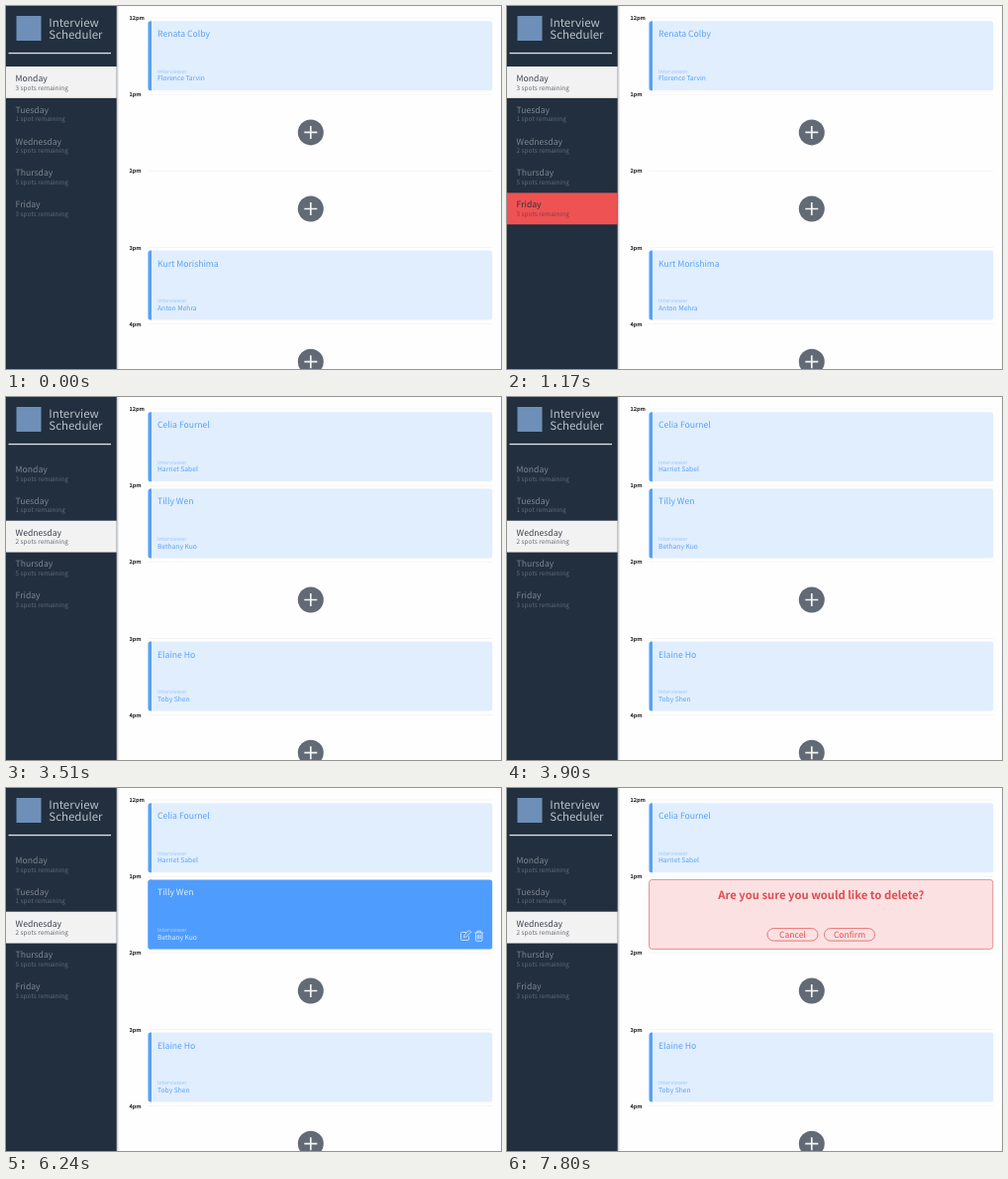
Recreate the animation shown at these times as an HTML page. Size 500x366 px, loop 8 s.

```html
<!DOCTYPE html>
<html lang="en">
<head>
<meta charset="utf-8">
<title>Interview Scheduler</title>
<style>
  html, body { margin: 0; width: 100%; height: 100%; overflow: hidden; background: #fefefe; }
  svg { display: block; width: 500px; height: 366px; }
  text {
    font-family: "Noto Sans CJK JP", "Noto Sans CJK SC", "Noto Sans", sans-serif;
    text-rendering: geometricPrecision;
    white-space: pre;
  }
</style>
</head>
<body>
<svg id="stage" viewBox="0 0 500 366"></svg>
<script>
const LOOP = 8000;
const ROW = 31.85;    // height of a day in the sidebar
const SLOT = 77.1;    // height of an hour in the schedule
const TOP = 15.3;     // top of the first card
const BLUE = '#58a1f6';
const RED = '#e04d50';
const stage = document.getElementById('stage');

function add(parent, tag, attrs = {}, content) {
  const el = document.createElementNS('http://www.w3.org/2000/svg', tag);
  for (const key in attrs) el.setAttribute(key, attrs[key]);
  if (content) el.textContent = content;
  parent.appendChild(el);
  return el;
}

function label(parent, x, y, size, fill, content, weight = 400, anchor = 'start') {
  return add(parent, 'text', {
    x, y, fill, 'font-size': size, 'font-weight': weight, 'text-anchor': anchor
  }, content);
}

const show = (el, on) => el.setAttribute('display', on ? 'inline' : 'none');
const group = (parent, y = 0) => add(parent, 'g', { transform: `translate(0 ${y})` });

// Sidebar
add(stage, 'rect', { width: 500, height: 366, fill: '#fefefe' });
add(stage, 'rect', { x: 111, width: 3, height: 366, fill: '#eceef0' });
add(stage, 'rect', { x: 111, width: 1.8, height: 366, fill: '#c6cad0' });
add(stage, 'rect', { width: 111.7, height: 366, fill: '#222f3e' });
add(stage, 'rect', { x: 10.5, y: 10, width: 25, height: 25, fill: '#6d8fb8' });
label(stage, 43.3, 20.8, 11.5, '#b9c0c8', 'Interview', 300);
label(stage, 43.3, 32.5, 11.5, '#b9c0c8', 'Scheduler', 300);
add(stage, 'rect', { x: 2.5, y: 46.9, width: 103.5, height: 1.3, fill: '#dfe3e7' });

const DAY_STYLES = {
  idle: { back: 'none', title: '#7c8691', note: '#5f6b78' },
  hover: { back: '#ef5253', title: '#3c2d39', note: '#893d46' },
  selected: { back: '#f2f2f2', title: '#3b4250', note: '#666c75' }
};

const days = [
  ['Monday', '3 spots'], ['Tuesday', '1 spot'], ['Wednesday', '2 spots'],
  ['Thursday', '5 spots'], ['Friday', '3 spots']
].map(([name, spots], i) => {
  const g = group(stage, 61 + i * ROW);
  return {
    back: add(g, 'rect', { width: 111.7, height: ROW }),
    title: label(g, 9.6, 14.9, 8.65, '', name),
    note: label(g, 9.6, 23.6, 6.45, '', spots + ' remaining', 300)
  };
});

function styleDay(day, state) {
  for (const part in day) day[part].setAttribute('fill', DAY_STYLES[state][part]);
}

// Schedule
['12pm', '1pm', '2pm', '3pm', '4pm'].forEach((hour, i) => {
  const y = 12 + i * SLOT;
  label(stage, 124.5, y + 2.2, 5.55, '#1c1c1c', hour, 700);
  add(stage, 'rect', { x: 143.5, y: y - 0.4, width: 348, height: 0.8, fill: '#f3f3f3' });
});

function card(parent, slot, name, interviewer, active = false) {
  const g = group(parent, TOP + slot * SLOT);
  const ink = active ? '#e2efff' : BLUE;
  add(g, 'rect', { x: 143.5, width: 347.7, height: 70, rx: 2.5, fill: active ? '#4f9cff' : '#e1eefe' });
  add(g, 'path', { d: 'M147 0H146Q143.5 0 143.5 2.5V67.5Q143.5 70 146 70H147Z', fill: active ? '#4f9cff' : BLUE });
  label(g, 153, 16, 8.65, ink, name);
  label(g, 153, 52.7, 5.5, active ? '#b0d2ff' : '#9dc6fa', 'Interviewer', 300);
  label(g, 153, 60.2, 6.7, ink, interviewer);
  return g;
}

function plus(parent, slot) {
  const g = add(parent, 'g', { transform: `translate(307.8 ${50.3 + slot * SLOT})` });
  add(g, 'circle', { r: 13, fill: '#626a75' });
  add(g, 'path', { d: 'M-6.5 0H6.5M0 -6.5V6.5', stroke: '#f4f5f6', 'stroke-width': 1.7 });
}

function cardIcons(parent) {
  const g = add(parent, 'g', {
    fill: 'none', stroke: '#d9eaff', 'stroke-width': 0.9, 'stroke-linejoin': 'round'
  });
  add(g, 'path', { d: 'M465 53H460.5Q459.5 53 459.5 54V60Q459.5 61 460.5 61H466.5Q467.5 61 467.5 60V57' });
  add(g, 'path', { d: 'M462.5 58L463 55.8L467.8 51L469.7 52.9L464.8 57.6Z' });
  add(g, 'path', { d: 'M473.5 53.5H482M476 53.5V51.8H479.5V53.5M474.5 53.5V61Q474.5 62 475.5 62H480Q481 62 481 61V53.5M476.4 55.5V60M477.8 55.5V60M479.2 55.5V60' });
}

function button(parent, x, content) {
  add(parent, 'rect', {
    x, y: 49.2, width: 51, height: 12.5, rx: 6.25,
    fill: 'none', stroke: '#e36a6d', 'stroke-width': 0.9
  });
  label(parent, x + 25.5, 58.5, 8.55, RED, content, 400, 'middle');
}

const monday = group(stage);
card(monday, 0, 'Renata Colby', 'Florence Tarvin');
card(monday, 3, 'Kurt Morishima', 'Anton Mehra');
plus(monday, 1);

const wednesday = group(stage);
card(wednesday, 0, 'Celia Fournel', 'Harriet Sabel');
card(wednesday, 3, 'Elaine Ho', 'Toby Shen');
const booking = ['Tilly Wen', 'Bethany Kuo'];
const resting = card(wednesday, 1, ...booking);
const active = card(wednesday, 1, ...booking, true);
cardIcons(active);

const confirm = group(wednesday, TOP + SLOT);
add(confirm, 'rect', {
  x: 143.6, width: 347.2, height: 70, rx: 3,
  fill: '#fbe1e2', stroke: '#e58487', 'stroke-width': 0.9
});
label(confirm, 317.3, 19.6, 11.25, RED, 'Are you sure you would like to delete?', 700, 'middle');
button(confirm, 263, 'Cancel');
button(confirm, 320.5, 'Confirm');

plus(stage, 2);
plus(stage, 4);

// Pointer moves up the sidebar, picks a day, then deletes a booking
const HOVERS = [[1170, 1560, 4], [1560, 2340, 3], [2340, 3510, 2]];
const PICK = 3510, ENTER = 6240, ASK = 7800;

function render(t) {
  const chosen = t < PICK ? 0 : 2;
  const hover = HOVERS.find(([from, to]) => t >= from && t < to);
  days.forEach((day, i) => {
    styleDay(day, i === chosen ? 'selected' : hover && hover[2] === i ? 'hover' : 'idle');
  });
  show(monday, t < PICK);
  show(wednesday, t >= PICK);
  show(resting, t < ENTER);
  show(active, t >= ENTER && t < ASK);
  show(confirm, t >= ASK);
}

const start = performance.now();
function tick() {
  render((performance.now() - start) % LOOP);
  requestAnimationFrame(tick);
}
tick();
</script>
</body>
</html>
```
